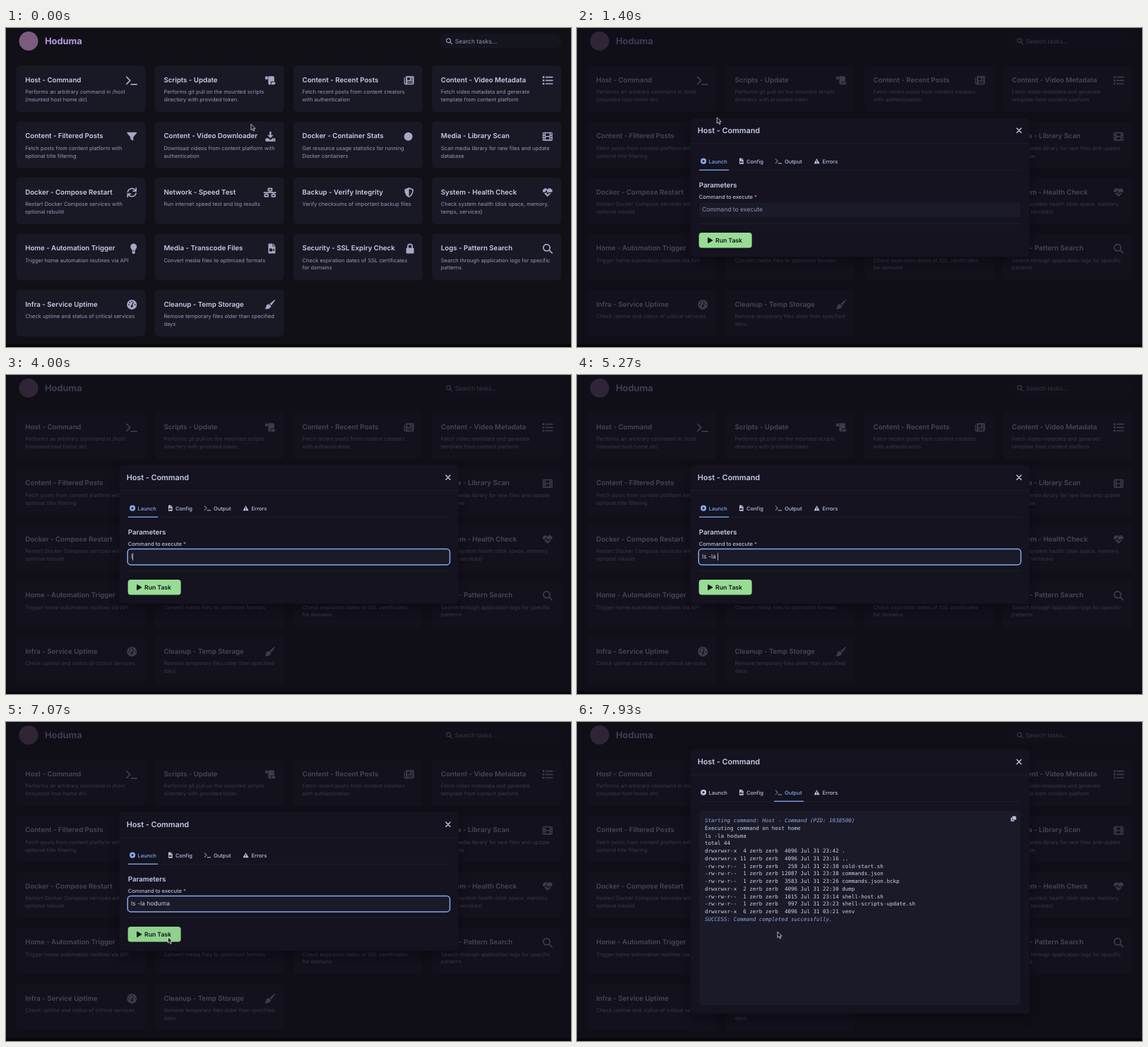
Write an HTML page that moves like this. It is 800 px wide and 452 px high and loops after 8000 ms.

```html
<!DOCTYPE html>
<html lang="en">
<head>
<meta charset="utf-8">
<title>Task dashboard</title>
<style>
  html, body { margin: 0; width: 100%; height: 100%; overflow: hidden; background: #101016; }
  svg { display: block; width: 800px; height: 452px; }
  text { font-family: Inter, "Noto Sans", sans-serif; white-space: pre; text-rendering: geometricPrecision; }
  .brand { font-size: 12.86px; font-weight: 700; fill: #b99ae6; }
  .title { font-size: 9.68px; font-weight: 600; fill: #c6cce8; }
  .desc { font-size: 7.5px; fill: #9499b3; }
  .field { font-size: 8.55px; fill: #c6cce8; }
  .hint { font-size: 8.55px; fill: #8f93ab; }
  .head { font-size: 10.8px; font-weight: 600; fill: #c6cce8; }
  .tab { font-size: 7.5px; font-weight: 500; fill: #b9c0dc; }
  .tab.on { fill: #82aaf0; }
  .run { font-size: 8.65px; font-weight: 600; fill: #11111b; }
  .code { font-family: "DejaVu Sans Mono", "Liberation Mono", monospace; font-size: 7.5px; fill: #cdd3ea; }
  .note { font-style: italic; fill: #93a6e2; }
</style>
</head>
<body>
<svg id="stage" viewBox="0 0 800 452"></svg>
<script>
const CARD = '#191926', CARD_HOVER = [40, 41, 54], CARD_RGB = [25, 25, 38];
const BLUE = '#82aaf0', LINE = '#242433', ICON = '#a3a8c3';

// Icons live in a 14-unit box: f = filled path, s = stroked path, c = path cut in the card colour.
const DISC = 'M0 7a7 7 0 1014 0A7 7 0 100 7z';
const ICONS = {
  terminal: { s: 'M-.5 2l5 5-5 5M6 12.5h8' },
  scroll: { f: 'M-.5 3a2 2 0 014 0v2.5h-3a1 1 0 01-1-1zM4 1h6.5a2 2 0 012 2v5.5H7.5v3a1.5 1.5 0 01-3.5 0zM8.5 9.5H14v1.2a2.3 2.3 0 01-2.3 2.3H7.5q1-.8 1-2z' },
  news: { f: 'M2.5 1H13a1 1 0 011 1v9a2 2 0 01-2 2H2a2 2 0 01-2-2V3h1.2v8a.8.8 0 001.3 0zM4.5 3v3.5h4V3zM10 3v1.2h2.3V3zM10 5.5v1.2h2.3V5.5zM4.5 8v1.2h7.8V8zM4.5 10.3v1.2h7.8v-1.2z' },
  list: { f: 'M0 1h2.6v2.6H0zM0 5.7h2.6v2.6H0zM0 10.4h2.6V13H0z', s: 'M4.8 2.3H14M4.8 7H14M4.8 11.7H14' },
  filter: { f: 'M.8 1h12.4a.8.8 0 01.6 1.3L9 8v5l-4-2.2V8L.2 2.3A.8.8 0 01.8 1z' },
  download: { f: 'M5.8 0h2.4v5h3L7 9.3 2.8 5h3zM1 9.5h3L7 12l3-2.5h3a1 1 0 011 1V13a1 1 0 01-1 1H1a1 1 0 01-1-1v-2.5a1 1 0 011-1zM11 11.2v1.2h1.3v-1.2z' },
  dot: { f: 'M0 7a6 6 0 1012 0A6 6 0 100 7z' },
  film: { f: 'M1.5 1h11A1.5 1.5 0 0114 2.5v9a1.5 1.5 0 01-1.5 1.5h-11A1.5 1.5 0 010 11.5v-9A1.5 1.5 0 011.5 1z' +
    [2.6, 6.1, 9.6].map(y => `M1.3 ${y}v1.8h1.6v-1.8zM11.1 ${y}v1.8h1.6v-1.8z`).join('') + 'M4.3 2.6v3.7h5.4V2.6zM4.3 7.7v3.7h5.4V7.7z' },
  sync: { s: 'M1.2 6A6 6 0 0112 4M12.8 8A6 6 0 012 10M13 .8V5H8.8M1 13.2V9h4.2' },
  network: { s: 'M4 1.2h5v3.3H4zM-1 9.5h4.6v3.3H-1zM9 9.5h4.6v3.3H9zM6.5 4.5V7M-2 7h16.5M1.3 7v2.5M11.3 7v2.5' },
  shield: { f: 'M7 0l6.3 2.5C13.3 8 11.5 12 7 14 2.5 12 .7 8 .7 2.5zM7 1.8v10.3c3-1.7 4.5-4.5 4.6-8.4z' },
  heart: { f: 'M7 13L1 7A3.6 3.6 0 017 2.6 3.6 3.6 0 0113 7z', c: 'M0 7.2h4l1.2-2.5 2 4.5 1.3-2H14' },
  bulb: { f: 'M9.5 0A4.5 4.5 0 0114 4.5c0 2.3-2 3-2.2 5.5H7.2C7 7.5 5 6.8 5 4.5A4.5 4.5 0 019.5 0zM7.3 10.8h4.4v1.4a2.2 2.2 0 01-4.4 0z' },
  file: { f: 'M5 0h5v4h4v9a1 1 0 01-1 1H5a1 1 0 01-1-1V1a1 1 0 011-1zM10.8 0L14 3.2h-3.2zM5.6 7v4h4V7zM10.2 8.5v1l2.2 1.5V7z' },
  lock: { f: 'M4.5 6V4a4 4 0 018 0v2h.5a1 1 0 011 1v6a1 1 0 01-1 1H4a1 1 0 01-1-1V7a1 1 0 011-1zM6.3 6h4.4V4a2.2 2.2 0 00-4.4 0z' },
  search: { s: 'M1 5.8a4.7 4.7 0 109.4 0a4.7 4.7 0 10-9.4 0M9.2 9.2l4.2 4.2' },
  gauge: { f: DISC + 'M7 10.8A1.6 1.6 0 008 8L9.8 3.6 8.7 3.1 6.9 7.6A1.6 1.6 0 007 10.8zM2 6.4h1.5v1.5H2zM3.2 3.2h1.5v1.5H3.2zM10.8 6.4h1.5v1.5h-1.5zM6.2 1.6h1.5v1.5H6.2z' },
  brush: { f: 'M14 .3L8.5 8 6 5.8 13 0zM5.3 6.5l2.6 2.3C7.5 12 4 14-1 13.2c1.5-1 1.5-2 2-4 .5-1.9 2.5-3 4.3-2.7z' },
  play: { f: DISC + 'M5 3.8L10.5 7 5 10.2z' },
  warn: { f: 'M7 .8l7 12.4H0zM6.2 5v4h1.6V5zM6.2 10.2v1.5h1.6v-1.5z' },
  copy: { f: 'M5 0h6l3 3v6a1 1 0 01-1 1H5a1 1 0 01-1-1V1a1 1 0 011-1zM1 4h2v7h6v2a1 1 0 01-1 1H1a1 1 0 01-1-1V5a1 1 0 011-1z' }
};

const CARDS = [
  ['Host - Command', 'terminal', 'Performs an arbitrary command in /host', '(mounted host home dir).'],
  ['Scripts - Update', 'scroll', 'Performs git pull on the mounted scripts', 'directory with provided token.'],
  ['Content - Recent Posts', 'news', 'Fetch recent posts from content creators', 'with authentication'],
  ['Content - Video Metadata', 'list', 'Fetch video metadata and generate', 'template from content platform'],
  ['Content - Filtered Posts', 'filter', 'Fetch posts from content platform with', 'optional title filtering'],
  ['Content - Video Downloader', 'download', 'Download videos from content platform with', 'authentication'],
  ['Docker - Container Stats', 'dot', 'Get resource usage statistics for running', 'Docker containers'],
  ['Media - Library Scan', 'film', 'Scan media library for new files and update', 'database'],
  ['Docker - Compose Restart', 'sync', 'Restart Docker Compose services with', 'optional rebuild'],
  ['Network - Speed Test', 'network', 'Run internet speed test and log results'],
  ['Backup - Verify Integrity', 'shield', 'Verify checksums of important backup files'],
  ['System - Health Check', 'heart', 'Check system health (disk space, memory,', 'temps, services)'],
  ['Home - Automation Trigger', 'bulb', 'Trigger home automation routines via API'],
  ['Media - Transcode Files', 'file', 'Convert media files to optimized formats'],
  ['Security - SSL Expiry Check', 'lock', 'Check expiration dates of SSL certificates', 'for domains'],
  ['Logs - Pattern Search', 'search', 'Search through application logs for specific', 'patterns'],
  ['Infra - Service Uptime', 'gauge', 'Check uptime and status of critical services'],
  ['Cleanup - Temp Storage', 'brush', 'Remove temporary files older than specified', 'days']
];

const FILES = [
  ['drwxrwxr-x', 4, 4096, '23:42', '.'],
  ['drwxrwxr-x', 11, 4096, '23:16', '..'],
  ['-rw-rw-r--', 1, 258, '22:38', 'cold-start.sh'],
  ['-rw-rw-r--', 1, 12087, '23:38', 'commands.json'],
  ['-rw-rw-r--', 1, 3583, '23:26', 'commands.json.bckp'],
  ['drwxrwxr-x', 2, 4096, '22:30', 'dump'],
  ['-rw-rw-r--', 1, 1015, '23:14', 'shell-host.sh'],
  ['-rw-rw-r--', 1, 997, '23:23', 'shell-scripts-update.sh'],
  ['drwxrwxr-x', 6, 4096, '03:21', 'venv']
];
const COMMAND = 'ls -la hoduma';
const OUTPUT = [
  'Starting command: Host - Command (PID: 1938500)',
  'Executing command on host home', COMMAND, 'total 44',
  ...FILES.map(([mode, links, size, time, name]) =>
    `${mode} ${String(links).padStart(2)} zerb zerb ${String(size).padStart(5)} Jul 31 ${time} ${name}`),
  'SUCCESS: Command completed successfully.'
];

const text = (x, y, cls, s, id = '') => `<text xml:space="preserve" x="${x}" y="${y}" class="${cls}" id="${id}">${s}</text>`;
const rect = (x, y, w, h, r, fill, more = '') =>
  `<rect x="${x}" y="${y}" width="${w}" height="${h}" rx="${r}" fill="${fill}" ${more}/>`;
const icon = (name, x, y, k = 1, color = ICON) => {
  const { f, s, c } = ICONS[name];
  return `<g transform="translate(${x} ${y}) scale(${k})">` +
    (f ? `<path d="${f}" fill="${color}" fill-rule="evenodd"/>` : '') +
    (s ? `<path d="${s}" fill="none" stroke="${color}" stroke-width="1.7" stroke-linecap="round" stroke-linejoin="round"/>` : '') +
    (c ? `<path d="${c}" fill="none" stroke="${CARD}" stroke-width="1.2"/>` : '') + '</g>';
};

function card([title, glyph, ...lines], i) {
  const x = 14.5 + (i % 4) * 196.2, y = 53 + Math.floor(i / 4) * 79.4;
  return rect(x, y, 183, 66.3, 6, CARD, `id="card${i}"`) +
    text(x + 12.7, y + 24, 'title', title) +
    lines.map((s, n) => text(x + 12.7, y + 40.4 + n * 10.75, 'desc', s)).join('') +
    icon(glyph, x + 156.7, y + 14.3);
}

const TABS = [['Launch', 'play', 175, 186.5, 173, 42], ['Config', 'file', 227.6, 240, 228, 38],
  ['Output', 'terminal', 281.5, 294, 279, 42], ['Errors', 'warn', 335.5, 347.5, 334, 37]];

function dialog(y, h, active) {
  return rect(160.5, y + 7, 480, h, 6, '#000', 'opacity=".3" filter="url(#blur)"') +
    rect(160.5, y, 480, h, 6, '#14131f') +
    text(170.7, y + 21.6, 'head', 'Host - Command') +
    `<path d="M622.8 ${y + 14.5}l6.2 6.2m0-6.2l-6.2 6.2" stroke="#c6cce8" stroke-width="1.4" stroke-linecap="round"/>` +
    rect(160.5, y + 35.8, 480, .8, 0, LINE) +
    rect(173, y + 73.8, 455, .7, 0, LINE) +
    TABS.map(([name, glyph, ix, tx, ux, uw], i) =>
      icon(glyph, ix, y + 57, .58, i === active ? BLUE : '#b9c0dc') +
      text(tx, y + 63.9, i === active ? 'tab on' : 'tab', name) +
      (i === active ? rect(ux, y + 73, uw, 1.3, 0, BLUE) : '')).join('');
}

const launch = dialog(127.6, 196.4, 0) +
  text(172.8, 225.6, 'title', 'Parameters') +
  text(172.8, 242, 'tab', 'Command to execute <tspan fill="#e0809c">*</tspan>') +
  rect(173, 247, 455, 21.3, 4, '#1a1a28') +
  rect(172.2, 246.5, 456.3, 22.4, 4.5, 'none', `stroke="${BLUE}" stroke-width="1.5" id="ring"`) +
  text(177, 260.4, 'hint', 'Command to execute', 'hint') +
  text(177, 260.4, 'field', '', 'field') +
  rect(0, 252.3, .8, 10.4, 0, '#d5daf0', 'id="caret"') +
  rect(173, 276.7, 455, .8, 0, LINE) +
  rect(172.6, 290, 75, 21.6, 4, '#98dd94', 'id="run"') +
  '<path d="M185.6 297.2l6.4 3.7-6.4 3.7z" fill="#11111b" stroke="#11111b" stroke-linejoin="round"/>' +
  text(196, 303.9, 'run', 'Run Task');

const output = dialog(38.7, 374.6, 2) +
  rect(173, 126, 455, 275, 4, '#1a1a28') +
  icon('copy', 614.3, 133.2, .54, '#b9c0dc') +
  OUTPUT.map((s, i) => text(181, 142.3 + i * 10.72, i % 13 ? 'code' : 'code note', s, 'out' + i)).join('');

const $ = id => document.getElementById(id);
$('stage').innerHTML =
  '<defs><filter id="blur" x="-20%" y="-20%" width="140%" height="150%"><feGaussianBlur stdDeviation="8"/></filter></defs>' +
  rect(0, 0, 800, 452, 0, '#101016') +
  '<circle cx="32" cy="18.5" r="13.5" fill="#7d5a80"/>' +
  text(55, 23, 'brand', 'Hoduma') +
  rect(613.5, 8, 173, 21, 10.5, '#15151f') +
  icon('search', 623, 14.3, .62) + text(635.7, 21.5, 'hint', 'Search tasks...') +
  CARDS.map(card).join('') +
  rect(0, 0, 800, 448.5, 0, '#110f19', 'id="dim"') +
  `<g id="launch">${launch}</g><g id="output">${output}</g>` +
  rect(0, 448.5, 800, 3.5, 0, '#0b0308') +
  '<path id="mouse" d="M0 0v8.3l1.9-1.7 1.4 3.1 1.5-.7-1.4-3h2.6z" fill="#0a0a0e" stroke="#e8e8ee" stroke-width=".8" stroke-linejoin="round"/>';

// Pointer path: time, x, y, easing of the way there.
const EASE = {
  both: u => u * u * (3 - 2 * u),
  in: u => u * u,
  out: u => 1 - (1 - u) * (1 - u)
};
const PATH = [
  [0, 347, 136.3, 'both'], [800, 132.5, 93.8, 'both'], [1130, 132.5, 93.8, 'both'],
  [1400, 198.2, 126.8, 'in'], [2200, 231.4, 254.8, 'out'], [6400, 231.4, 254.8, 'both'],
  [6930, 229.4, 304.8, 'both'], [7300, 229.4, 304.8, 'both'], [7530, 256, 306, 'in'], [7870, 284, 297.2, 'out']
];
const KEYS = [3600, 4130, 4470, 4730, 5000, 5130, 5270, 5730, 5870, 6000, 6130, 6270, 6400];
const HOVERS = [[0, 532, 1130], [1, 386, 501]];
const FOCUS = 2600, OPEN = 1100, SWITCH = 7200;

const ramp = (t, start, span) => Math.min(1, Math.max(0, (t - start) / span));
const show = (id, on) => $(id).setAttribute('visibility', on ? 'visible' : 'hidden');
const fade = (id, a) => $(id).setAttribute('opacity', a);

function pointer(t) {
  const i = PATH.findIndex(p => p[0] > t);
  if (i < 0) return PATH[PATH.length - 1].slice(1, 3);
  const [t0, x0, y0] = PATH[i - 1], [t1, x1, y1, ease] = PATH[i];
  const u = EASE[ease]((t - t0) / (t1 - t0));
  return [x0 + (x1 - x0) * u, y0 + (y1 - y0) * u];
}

function draw(t) {
  const [x, y] = pointer(t);
  $('mouse').setAttribute('transform', `translate(${x} ${y})`);
  show('mouse', t < KEYS[0] || t > 6390);

  for (const [i, on, off] of HOVERS) {
    const a = ramp(t, on, 150) - ramp(t, off, 150);
    $('card' + i).setAttribute('fill', `rgb(${CARD_RGB.map((c, n) => Math.round(c + (CARD_HOVER[n] - c) * a))})`);
  }

  const opened = ramp(t, OPEN, 200);
  fade('dim', opened * .7);
  fade('launch', t < SWITCH ? opened : 0);
  fade('output', t < SWITCH ? 0 : 1);
  fade('ring', ramp(t, FOCUS, 120));

  const typed = KEYS.filter(k => k <= t + 5).length;
  $('field').textContent = COMMAND.slice(0, typed);
  show('hint', typed === 0);
  const edit = typed ? KEYS[typed - 1] : FOCUS;
  $('caret').setAttribute('x', 177 + (typed ? $('field').getComputedTextLength() : 0));
  show('caret', t >= FOCUS && t < SWITCH && (t - edit + 5) % 1000 < 505);
  $('run').setAttribute('fill', t > 6830 ? '#8fd28c' : '#98dd94');

  OUTPUT.forEach((s, i) => show('out' + i, t > (i ? 7320 : SWITCH)));
}

// The picture advances in steps of 1/15 s.
let begin;
function tick() {
  const now = performance.now();
  begin ??= now;
  draw(Math.floor(((now - begin) % 8000 + 4) * .015) / .015);
  requestAnimationFrame(tick);
}
tick();
</script>
</body>
</html>
```
